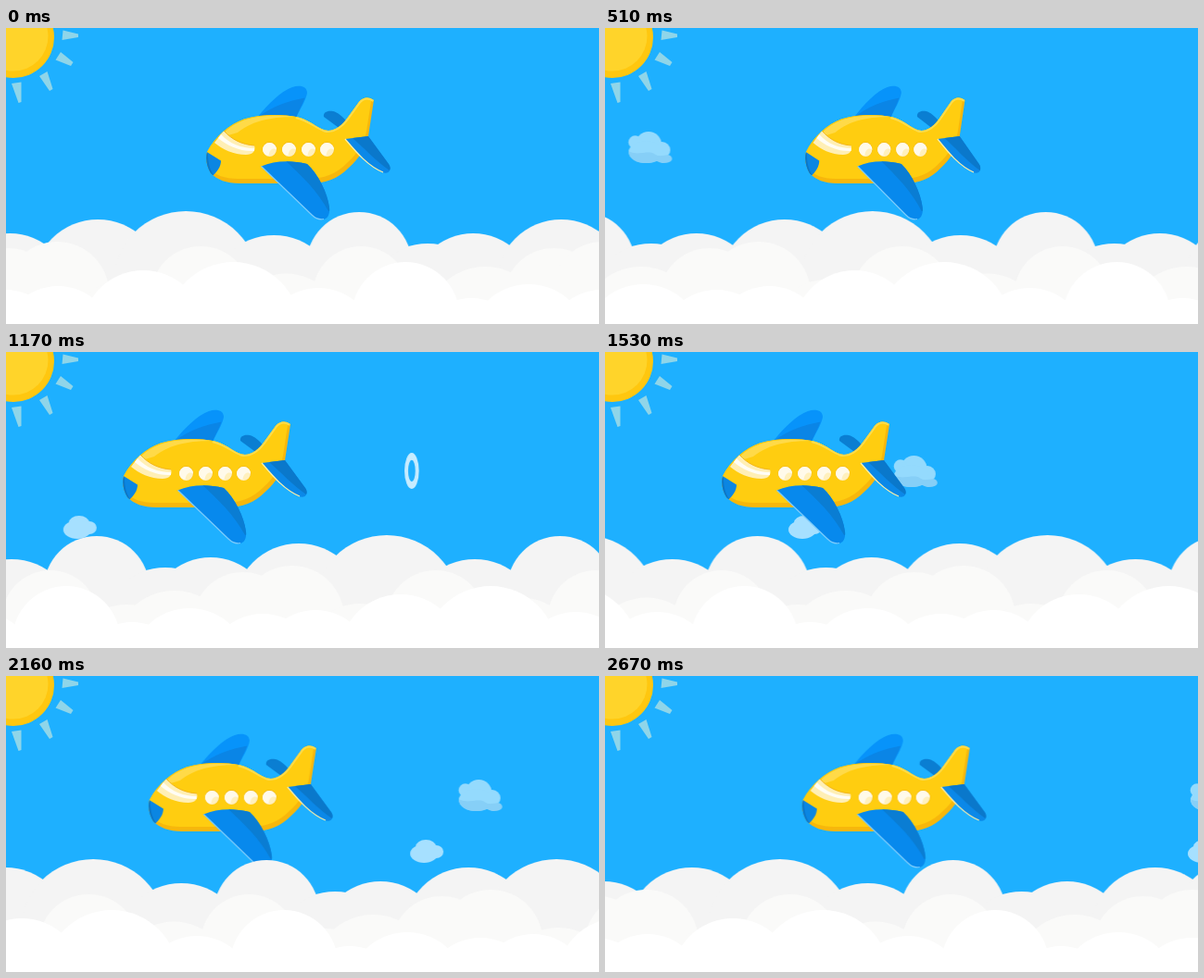
Write an HTML page that moves like this. It is 640 by 320 pixels and loops after 2700 ms.

```html
<!DOCTYPE html>
<html lang="en">
<head>
<meta charset="utf-8">
<title>Plane above the clouds</title>
<style>
  html, body { margin: 0; width: 100%; height: 100%; overflow: hidden; background: #1eb0ff; }
  svg { display: block; width: 640px; height: 320px; }
</style>
</head>
<body>
<svg viewBox="0 0 640 320">
  <defs>
    <path id="body" d="M217 134C226 117 241 104 257 98.500C275 93 298 93 313 96C327 99 334 107 344 110.500C354 113 363 105 368 98L381 80C385 75 391 74 397 78L391 117C389 129 381 141 370 151C358 163 345 168 328 168H252C238 168 228 164 221 157C217 151 215 142 217 134Z"/>
    <clipPath id="hull"><use href="#body"/></clipPath>
    <path id="wing" d="M275.500 149.500C290 143 308 143 325 147C337 158 347 178 349 194C350 203 346 208 339 207C335 206 333 204 330 202Z"/>
    <clipPath id="wingClip"><use href="#wing"/></clipPath>
    <g id="window">
      <circle r="8" cy="-.4" fill="#f5bd1c"/>
      <circle r="7.400" fill="#fff0bd"/>
      <path d="M-7.400 0A7.400 7.400 0 0 1 7.400 0C4 -2 0 -1 -1 6.500C-5 6 -7.400 3 -7.400 0Z" fill="#fffaea"/>
    </g>
  </defs>

  <rect width="640" height="320" fill="#1eb0ff"/>

  <g id="sun">
    <g fill="#8fd5e9">
      <path d="M61.500 2.500L78 6.500V10L60.500 13Z"/>
      <path d="M59 26L72.500 37L70 41L53.500 34.500Z"/>
      <path d="M36 52L44.500 47L50.500 66L47 68Z"/>
      <path d="M6 60L16.500 58.500L16.500 80L13.500 81Z"/>
    </g>
    <circle cx="8" cy="10" r="44" fill="#ffc70f"/>
    <circle cx="8" cy="9" r="37.500" fill="#ffd42a"/>
  </g>

  <g id="puff">
    <g fill="#94dafd">
      <circle cx="46.500" cy="126" r="14"/>
      <circle cx="32" cy="123.500" r="7.200"/>
      <circle cx="61" cy="132" r="9"/>
      <ellipse cx="44" cy="134" rx="19" ry="12"/>
    </g>
    <path d="M25 133C35 139 47 131 54 137C59 140 66 136 69 137.500C74 140 73 146 63 146C58 146 57 144 55 144C44 148 26 147 25 133Z" fill="#86cff7"/>
  </g>

  <g id="wisp" fill="#a6e0ff">
    <ellipse cx="350" cy="184.500" rx="11" ry="7.500"/>
    <ellipse cx="361" cy="190" rx="8" ry="7"/>
    <ellipse cx="348" cy="192" rx="15" ry="10"/>
  </g>

  <path id="ring" fill="#fff" fill-rule="evenodd" style="transform-origin:385px 148px"
    d="M379 133a6 15 0 1 1 12 0a6 15 0 1 1 -12 0ZM382 133a3 9 0 1 0 6 0a3 9 0 1 0 -6 0Z"/>

  <g id="plane" style="transform-origin:216px 0">
    <path d="M271 97C283 82 297 68 309 64C317 61 325 63 325 70C324 78 317 88 312 99Z" fill="#0793fa"/>
    <path d="M271 97C288 84 304 79 322.500 75.500C320 83 315 91 312 99Z" fill="#0a85e6"/>
    <path d="M343 96C342 91 347 89 353 90C358 91 363 96 368 101L362 110Z" fill="#0a7ed2"/>

    <use href="#body" fill="#f7b70b"/>
    <g clip-path="url(#hull)">
      <use href="#body" x="-2" y="-5" fill="#ffcd10"/>
      <path d="M230 119C248 96 275 92 316 96C288 96 268 99 250 113Z" fill="#ffda48"/>
      <path d="M313 96C327 99 334 107 344 110.500C354 113 363 105 368 98L381 80C385 75 391 74 397 78" fill="none" stroke="#ffdc4c" stroke-width="4"/>
      <path d="M212 131L232 143.500C232 150 228 155 223 160L210 158Z" fill="#0b86e2"/>
      <path d="M212 131L218 136C218 146 220 153 224 159L210 160Z" fill="#0a76c8"/>
      <path d="M235 111C244 121 255 126 268 127C270 133 266 137 259 137C246 137 233 131 225 124Z" fill="#ffefb5"/>
      <path d="M232 115C241 125 254 130 268 130L268 133C253 134 238 127 229 119Z" fill="#fffdf5"/>
      <path d="M235 111C244 121 255 126 268 127" fill="none" stroke="#f2b51a"/>
    </g>
    <use href="#window" x="284.500" y="131.500"/>
    <use href="#window" x="305.500" y="131.500"/>
    <use href="#window" x="326.500" y="131.500"/>
    <use href="#window" x="346.500" y="131.500"/>

    <path d="M366 120L391 117L413 147C417 153 413 159 406 156C391 149 377 133 366 120Z" fill="#0b88e8"/>
    <path d="M374 119L391 117L413 147C415 150 415 152 414 154C398 143 386 129 374 119Z" fill="#0a78cb"/>
    <path d="M366 120C377 133 390 149 407 156" fill="none" stroke="#fff0a8" stroke-width="1.300"/>

    <use href="#wing" fill="#0789ed"/>
    <path d="M298 140L340 140L355 196L348 198C335 174 316 157 298 140Z" fill="#0a7dd3" clip-path="url(#wingClip)"/>
    <path d="M275.500 149.500L330 202C334 206 338 207.500 343 206.500" fill="none" stroke="#7ccbfb" stroke-width="1.200"/>
  </g>

  <g id="back" fill="#f4f4f4"></g>
  <g id="middle" fill="#fafaf9"></g>
  <g id="front" fill="#fff"></g>
</svg>
<script>
const LOOP = 2700;
const get = id => document.getElementById(id);
const shift = (x, s = 1) => ({ transform: `translateX(${x}px) scale(${s})` });
const squash = (x, s = 1) => ({ transform: `translateX(${x}px) scaleX(${s})` });

// steps: [time in ms, properties]
function play(id, steps) {
  const frames = steps.map(([ms, props]) => ({ offset: ms / LOOP, ...props }));
  get(id).animate(frames, { duration: LOOP, iterations: Infinity });
}

// puffs: [x, top, radius], repeated every tile pixels above a solid base
function bank(id, tile, travel, base, puffs) {
  let svg = `<rect x="-1400" y="${base}" width="2800" height="${330 - base}"/>`;
  for (let k = -2; k < 2; k++)
    for (const [x, top, r] of puffs)
      svg += `<circle cx="${x + k * tile}" cy="${top + r}" r="${r}"/>`;
  get(id).innerHTML = svg;
  play(id, [[0, shift(0)], [LOOP, shift(travel)]]);
}

bank('back', 500, 500, 240, [
  [99, 207, 70], [194, 198, 79], [289, 224, 70],
  [381, 199, 57], [455, 233, 68], [504, 222, 66]
]);
bank('middle', 589, 585, 283, [
  [55, 231, 56], [128, 272, 60], [210, 236, 54], [302, 265.5, 60],
  [383, 236, 52], [465, 273, 60], [517, 258, 65], [591, 238, 54]
]);
bank('front', 644, 641, 298, [
  [56, 279, 60], [148, 262, 66], [245, 253, 72], [337, 281, 62],
  [431, 253, 58], [502, 292, 60], [564, 277, 64], [643, 283, 62]
]);

play('puff', [[0, shift(-143)], [LOOP, shift(615)]]);
play('wisp', [[0, shift(-714)], [LOOP, shift(307)]]);

play('plane', [
  [0, squash(0)], [540, squash(0, .95)], [675, squash(-27)],
  [750, squash(-42)], [1050, squash(-90)], [1920, squash(-90)], [LOOP, squash(0)]
]);

play('ring', [
  [0, shift(-26.5, .85)], [540, shift(-26.5, .85)],
  [1450, shift(88, 1.5)], [LOOP, shift(88, 1.5)]
]);
play('ring', [
  [0, { opacity: 0 }], [540, { opacity: 0 }], [540, { opacity: 1 }],
  [1080, { opacity: 1 }], [1450, { opacity: 0 }], [LOOP, { opacity: 0 }]
]);
</script>
</body>
</html>
```
